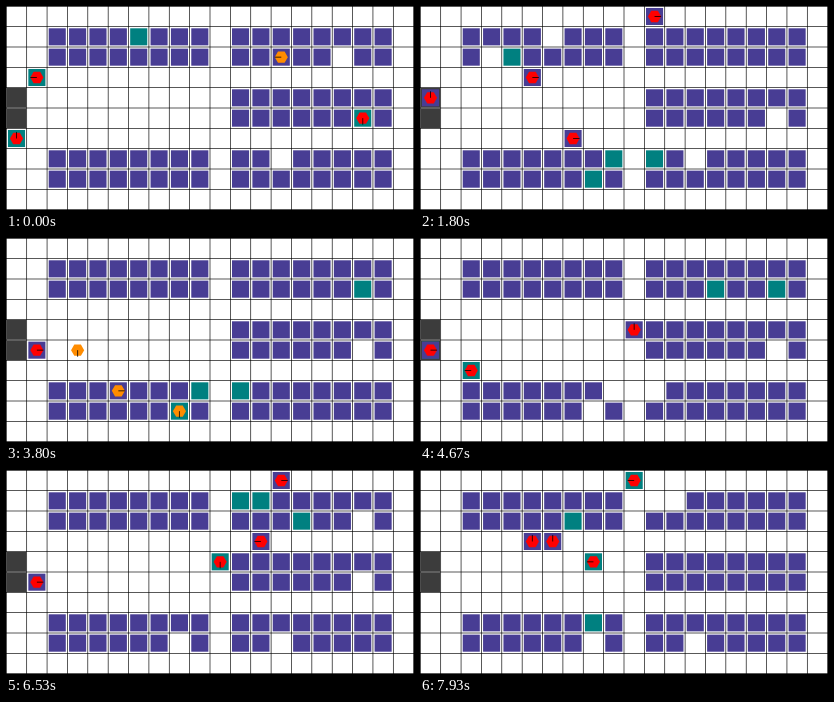
Animation of 408x204 px, one loop 8 s. Source, as an HTML page with a canvas:

```html
<!DOCTYPE html>
<html lang="en">
<head>
<meta charset="utf-8">
<title>Warehouse robots</title>
<style>
  html, body { margin: 0; width: 100%; height: 100%; overflow: hidden; background: #fff; }
  canvas { display: block; width: 408px; height: 204px; }
</style>
</head>
<body>
<canvas id="stage" width="408" height="204"></canvas>
<script>
const COLS = 20, ROWS = 10, CELL = 31, STEPS = 120, LOOP = 8000;
const COLORS = { shelf: '#483d94', wanted: '#008080', goal: '#3c3c3c', free: '#ff8c00', loaded: '#ff0000' };
const DIRS = [[1, 0], [0, 1], [-1, 0], [0, -1]]; // right, down, left, up

// Steps at which the legs of every route (separated by |) begin and end.
const MARKS = [0, 15, 39, 57, 83, 98, 119];

// "x,y" drives there (along x first), L lifts, U unloads,
// "Gx,y" delivers and asks for the shelf at x,y next.
const ROBOTS = [
  { x: 1, y: 3, dir: 2, load: { wanted: true }, route:
    '0,4 G9,7 0,3 16,2 U | 3,2 L 3,3 0,4 G4,2 0,3 3,2 U 4,2 L 4,3 0,4 G7,8 0,3 2,3 |' +
    '4,2 U 4,7 7,8 L 7,9 0,5 G17,2 1,5 | 10,0 4,0 | 13,0 | 19,6 17,5 U 12,1 L 12,0 10,0' },
  { x: 13, y: 2, dir: 2, load: null, route:
    '6,1 L 6,0 0,4 G3,2 1,6 | 13,7 | U 8,8 | L 8,9 0,5 G12,1 1,3 11,3 |' +
    '18,3 12,3 | 17,2 U 14,2 L 14,3 0,4 G8,7 6,3' },
  { x: 0, y: 6, dir: 3, load: { wanted: true }, route:
    '0,5 G11,7 1,3 16,3 | 10,3 10,0 19,0 19,3 18,3 | 10,9 7,8 U 4,8 4,7 5,7 |' +
    '9,7 L 9,6 0,5 G14,2 0,6 9,7 U 9,8 13,8 | L 13,9 0,5 G11,1 1,5 |' +
    '1,3 14,2 U 11,1 L 11,0 10,4 8,4' },
  { x: 17, y: 5, dir: 1, load: { wanted: true }, route:
    '17,6 0,5 G8,8 2,5 | 2,3 13,3 | 10,0 6,1 U 3,5 |' +
    '11,7 L 11,6 0,5 G13,8 0,6 11,7 U 13,7 | 17,2 L 17,3 10,4 | 0,4 G7,2 5,3' }
];

const key = (x, y) => x + ',' + y;

// Expand a route into single actions: one per cell, quarter turn, lift or delivery.
function expand({ x, y, dir, route }) {
  return route.split('|').map(leg => {
    const actions = [];
    const drive = (want, count) => {
      if (!count) return;
      const turn = (want - dir + 4) % 4;
      for (let i = 0; i < (turn === 2 ? 2 : turn ? 1 : 0); i++) {
        dir = (dir + (turn === 3 ? 3 : 1)) % 4;
        actions.push({ turn: dir });
      }
      for (let i = 0; i < count; i++) actions.push({ move: DIRS[dir] });
    };
    for (const token of leg.trim().split(/\s+/)) {
      if (/^[LUG]/.test(token)) {
        actions.push({ task: token[0], place: token.slice(1) });
        continue;
      }
      const [tx, ty] = token.split(',').map(Number);
      drive(tx > x ? 0 : 2, Math.abs(tx - x));
      drive(ty > y ? 1 : 3, Math.abs(ty - y));
      x = tx;
      y = ty;
    }
    return actions;
  });
}

function perform(robot, action, shelves) {
  if (action.move) {
    robot.x += action.move[0];
    robot.y += action.move[1];
  } else if (action.turn !== undefined) {
    robot.dir = action.turn;
  } else {
    const here = key(robot.x, robot.y);
    if (action.task === 'L') {
      robot.load = shelves.get(here);
      shelves.delete(here);
    } else if (action.task === 'U') {
      shelves.set(here, robot.load);
      robot.load = null;
    } else {
      robot.load = { wanted: false };
      shelves.set(action.place, { wanted: true });
    }
  }
}

function buildShelves() {
  const shelves = new Map();
  for (const y of [1, 2, 4, 5, 7, 8])
    for (let x = 2; x < 19; x++)
      if (x !== 10 && (x > 10 || y < 4 || y > 5)) shelves.set(key(x, y), { wanted: false });
  ['16,2', '13,7', '17,5'].forEach(k => shelves.delete(k));
  shelves.set('6,1', { wanted: true });
  return shelves;
}

function simulate() {
  const shelves = buildShelves();
  const robots = ROBOTS.map(r => ({ ...r, legs: expand(r), leg: 0, done: 0 }));
  const history = [];
  for (let k = 0; k < STEPS; k++) {
    for (const r of robots) {
      if (k > MARKS[r.leg + 1]) { r.leg++; r.done = 0; }
      const from = MARKS[r.leg], to = MARKS[r.leg + 1], actions = r.legs[r.leg];
      const due = Math.floor((k - from) * actions.length / (to - from));
      while (r.done < due) perform(r, actions[r.done++], shelves);
    }
    history.push({
      shelves: [...shelves],
      robots: robots.map(({ x, y, dir, load }) => ({ x, y, dir, load }))
    });
  }
  return history;
}

const ctx = document.getElementById('stage').getContext('2d');
const width = COLS * CELL + 1, height = ROWS * CELL + 1;
ctx.scale(408 / width, 204 / height);

function drawFloor() {
  ctx.fillStyle = '#fff';
  ctx.fillRect(0, 0, width, height);
  ctx.fillStyle = '#000';
  for (let c = 0; c <= COLS; c++) ctx.fillRect(c * CELL, 0, 1, height);
  for (let r = 0; r <= ROWS; r++) ctx.fillRect(0, r * CELL, width, 1);
  ctx.fillStyle = COLORS.goal;
  for (const y of [4, 5]) ctx.fillRect(1, y * CELL + 1, CELL - 1, CELL - 1);
}

function drawShelf(x, y, { wanted }) {
  ctx.fillStyle = wanted ? COLORS.wanted : COLORS.shelf;
  ctx.fillRect(x * CELL + 3, y * CELL + 3, CELL - 5, CELL - 5);
}

function drawRobot({ x, y, dir, load }) {
  const cx = x * CELL + 16, cy = y * CELL + 16, radius = 10;
  if (load) drawShelf(x, y, load);
  ctx.fillStyle = load ? COLORS.loaded : COLORS.free;
  ctx.beginPath();
  for (let i = 0; i < 6; i++) {
    const a = i * Math.PI / 3;
    ctx.lineTo(cx + radius * Math.cos(a), cy + radius * Math.sin(a));
  }
  ctx.fill();
  ctx.strokeStyle = '#000';
  ctx.lineWidth = 1.2;
  ctx.beginPath();
  ctx.moveTo(cx, cy);
  ctx.lineTo(cx + DIRS[dir][0] * radius, cy + DIRS[dir][1] * radius);
  ctx.stroke();
}

const history120 = simulate();
const start = performance.now();

function render(now) {
  const t = Math.max(0, now - start) % LOOP;
  const step = Math.floor((t + 5) * STEPS / LOOP) % STEPS;
  const { shelves, robots } = history120[step];
  drawFloor();
  for (const [place, shelf] of shelves) drawShelf(...place.split(',').map(Number), shelf);
  robots.forEach(drawRobot);
  requestAnimationFrame(render);
}
render(start);
</script>
</body>
</html>
```
